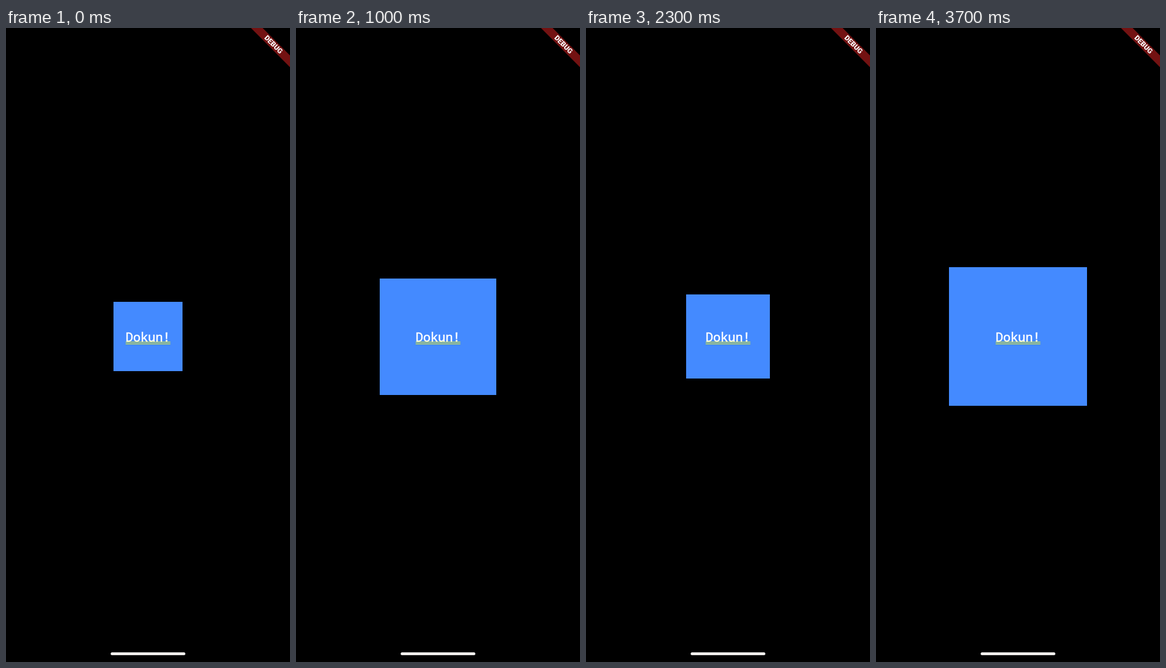
An HTML page that plays this animation: 502x1116 px, repeating every 3.9 s.

```html
<!DOCTYPE html>
<html lang="tr">
<head>
<meta charset="utf-8">
<title>Dokun</title>
<style>
html, body { margin: 0; width: 100%; height: 100%; overflow: hidden; background: #000; }
svg { display: block; width: 100vw; height: 100vh; }
.label { font: 400 21.96px "Noto Sans Mono", "DejaVu Sans Mono", monospace; fill: #fff; stroke: #fff; stroke-width: .55; }
.debug { font: 900 12.44px Roboto, sans-serif; fill: #fff; }
</style>
</head>
<body>
<svg viewBox="0 0 502 1116">
  <rect width="502" height="1116" fill="#000"/>
  <rect id="box" fill="#448aff"/>
  <g fill="#ffff00">
    <rect x="211.5" y="552.4" width="79" height="1.1"/>
    <rect x="211.5" y="555.5" width="79" height="1.1"/>
  </g>
  <text class="label" x="251" y="551.7" text-anchor="middle">Dokun!</text>
  <g transform="translate(502 0) rotate(45)">
    <rect x="-48.8" y="34.16" width="97.6" height="14.64" fill="#731212"/>
    <text class="debug" x="0" y="45.3" text-anchor="middle">DEBUG</text>
  </g>
  <rect x="185" y="1099" width="132" height="5" rx="2.5" fill="#f0eeec"/>
</svg>
<script>
const LOOP = 3900, STEP = 100, DURATION = 600;
const SMALL = 122, LARGE = 244, CX = 251, CY = 543.2;
const box = document.getElementById('box');

// The last growth stutters: [clock, elapsed animation time]
const stutter = [[3100, 164], [3200, 264], [3400, 320], [3600, 465], [3700, DURATION]];

const clamp = v => Math.min(1, Math.max(0, v));

// cubic-bezier(.42, 0, .58, 1)
function easeInOut(x) {
  if (x <= 0 || x >= 1) return clamp(x);
  let lo = 0, hi = 1;
  for (let i = 0; i < 24; i++) {
    const s = (lo + hi) / 2, r = 1 - s;
    if (1.26 * r * r * s + 1.74 * r * s * s + s * s * s < x) lo = s; else hi = s;
  }
  return lo * lo * (3 - 2 * lo);
}

const ramp = elapsed => easeInOut(clamp(elapsed / DURATION));

function growth(t) {
  if (t < 1800) return ramp(t - 635);
  if (t < 3000) return 1 - ramp(t - 1890);
  let elapsed = 0;
  for (const [at, value] of stutter) if (t >= at) elapsed = value;
  return ramp(elapsed);
}

function draw(ms) {
  const t = Math.floor((ms % LOOP) / STEP) * STEP;
  const size = SMALL + (LARGE - SMALL) * growth(t);
  const x = Math.round(CX - size / 2), y = Math.round(CY - size / 2);
  box.setAttribute('x', x);
  box.setAttribute('y', y);
  box.setAttribute('width', Math.round(CX + size / 2) - x);
  box.setAttribute('height', Math.round(CY + size / 2) - y);
}

let start;
function tick(now) {
  if (start === undefined) start = now;
  draw(now - start);
  requestAnimationFrame(tick);
}
draw(0);
requestAnimationFrame(tick);
</script>
</body>
</html>
```
